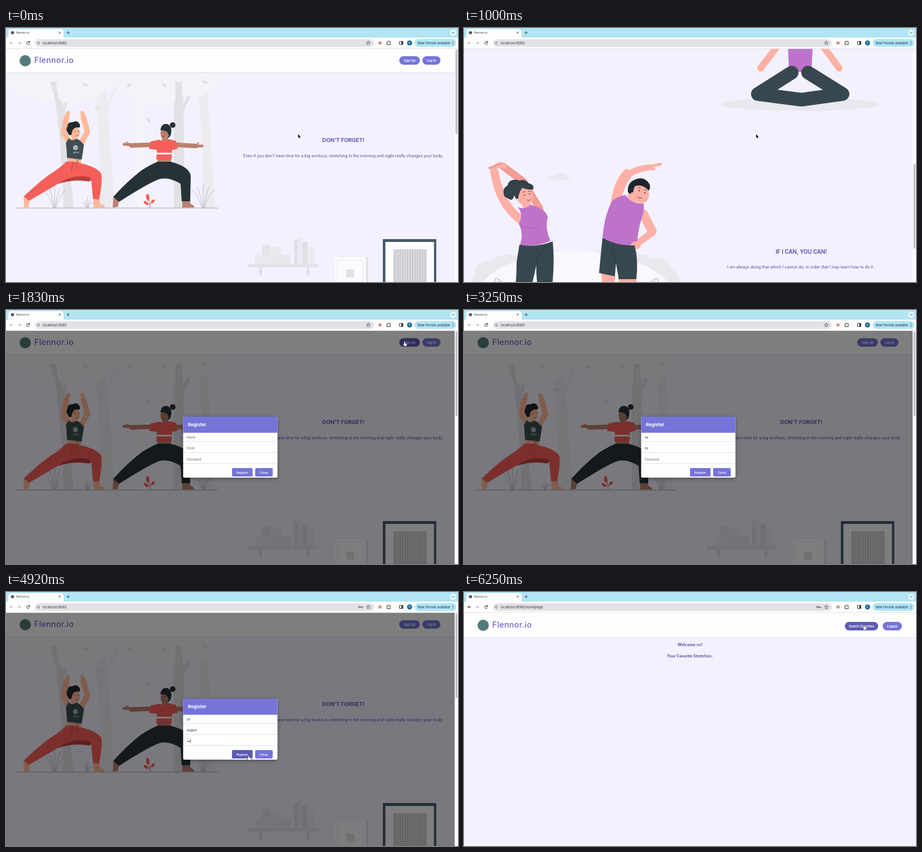
Recreate the animation shown at these times as an HTML page with a canvas. Size 800x450 px, loop 6.41 s.

```html
<!DOCTYPE html>
<html lang="en">
<head>
<meta charset="utf-8">
<title>flennor.io</title>
<style>
html, body { margin: 0; width: 100%; height: 100%; overflow: hidden; background: #f3f1fd; }
canvas { display: block; width: 800px; height: 450px; }
</style>
</head>
<body>
<canvas id="stage" width="800" height="450"></canvas>
<script>
const ctx = document.getElementById('stage').getContext('2d');
const LOOP = 6410, STEP = 1000 / 12, TOP = 37, END = 718;
const BG = '#f3f1fd', VIOLET = '#7574d8', HOVER = '#5b59b4', INK = '#4c48a8';
const DARK = '#263238', SLATE = '#37474f', CORAL = '#f55f5a';

// ---------- drawing helpers ----------
function shape(color, d) {
  ctx.fillStyle = color;
  ctx.fill(new Path2D(d));
}
function line(color, width, d, cap = 'round') {
  ctx.strokeStyle = color;
  ctx.lineWidth = width;
  ctx.lineCap = cap;
  ctx.lineJoin = 'round';
  ctx.stroke(new Path2D(d));
}
function rect(color, x, y, w, h, r = 0) {
  ctx.fillStyle = color;
  ctx.beginPath();
  ctx.roundRect(x, y, w, h, r);
  ctx.fill();
}
function oval(color, x, y, rx, ry = rx, turn = 0) {
  ctx.fillStyle = color;
  ctx.beginPath();
  ctx.ellipse(x, y, rx, ry, turn, 0, 7);
  ctx.fill();
}
function text(str, x, y, size, color, weight = 400, align = 'left') {
  ctx.font = `${weight} ${size}px Inter, sans-serif`;
  ctx.fillStyle = color;
  ctx.textAlign = align;
  ctx.fillText(str, x, y);
}
function placed(x, y, turn, flip, paint) {
  ctx.save();
  ctx.translate(x, y);
  ctx.rotate(turn);
  ctx.scale(flip, 1);
  paint();
  ctx.restore();
}
function track(t, keys) {
  let i = 1;
  while (i < keys.length - 1 && t > keys[i][0]) i++;
  const [a, va] = keys[i - 1], [b, vb] = keys[i];
  return va + (vb - va) * Math.max(0, Math.min(1, (t - a) / (b - a)));
}

// ---------- timeline ----------
const scrollKeys = [[0, 0], [83, 40], [167, 190], [250, 400], [333, 580], [417, 685], [500, END],
  [750, END], [917, 650], [1083, 480], [1250, 300], [1417, 150], [1583, 68], [1667, 15], [1750, 0]];
const path = [[0, 517, 188], [1250, 517, 188], [1583, 695, 87], [1750, 705, 56], [1917, 705, 56],
  [2500, 350, 226], [4667, 350, 226], [4833, 429, 290], [5333, 429, 290], [5917, 690, 90], [6167, 708, 59]];
const pointer = t => ({
  x: track(t, path.map(k => [k[0], k[1]])),
  y: track(t, path.map(k => [k[0], k[2]])),
  shown: t < 2830 || t > 4660
});
const typed = (str, t, times) => str.slice(0, times.filter(k => t >= k - 5).length);

// ---------- artwork ----------
function trunk(color, x, lean, w) {
  shape(color, `M${x} 80 L${x + w * .8} 80 Q${x + w + lean / 3} 190 ${x + w + lean} 319
    H${x + lean} Q${x + lean * .8} 180 ${x} 80Z`);
}
function grass(x, size) {
  for (let i = -2; i <= 2; i++)
    line('#8d8b98', .5, `M${x + i} 318 Q${x + i * size * .12} ${318 - size * .6} ${x + i * size * .25} ${318 - size + Math.abs(i) * 5}`);
}
function forest() {
  trunk('#ecebf0', 156, 12, 24);
  trunk('#f6f5fa', 226, 6, 16);
  trunk('#ecebf0', 338, 12, 20);
  trunk('#e2e1e5', 80, 22, 18);
  trunk('#e2e1e5', 297, 0, 19);
  line('#e2e1e5', 5, 'M102 150 Q105 120 126 98');
  line('#e2e1e5', 6, 'M308 160 Q317 125 343 94');
  line('#ecebf0', 5, 'M178 145 Q188 112 202 99');
  shape('#f4f3f7', 'M0 80 H205 Q194 107 175 109 Q165 131 138 126 Q113 144 90 124 Q70 138 47 122 Q20 125 15 101 Q4 104 0 94Z');
  shape('#f4f3f7', 'M184 80 H386 Q381 103 360 108 Q342 131 316 118 Q290 144 264 133 Q232 140 224 118 Q197 119 184 80Z');
  shape('#e2e1e5', 'M78 95 H88 L98 150 H93Z M300 95 H311 L314 165 H299Z');
  [[140, 100, .5], [162, 141, -.4], [218, 101, -.6], [252, 163, .8], [280, 101, .7], [352, 96, .4]]
    .forEach(([x, y, a]) => oval('#e0dee6', x, y, 5, 2.3, a));
  line('#9795a2', .9, 'M18 319 H375');
  grass(86, 40);
  grass(144, 18);
  grass(349, 42);
}
function warrior() {
  const skin = '#ffb99a';
  line(skin, 10, 'M114 204 L102 186 L107 158');
  line(skin, 10, 'M132 206 L144 184 L137 158');
  oval(skin, 109, 153, 3.5, 7, .4);
  oval(skin, 136, 153, 3.5, 7, -.4);
  rect(skin, 116, 186, 9, 15, 3);
  oval(skin, 122, 185, 9, 11);
  shape('#1f292e', 'M112 190 Q104 180 109 174 Q109 166 118 167 Q127 162 131 172 Q132 178 125 176 Q117 177 116 189Z');
  oval('#3d2c2b', 122, 183, .8);
  oval('#3d2c2b', 128, 183, .8);
  line('#3d2c2b', .7, 'M124 191 q2 1 4 -1');
  rect(skin, 109, 229, 24, 13);
  shape('#3f4d55', 'M111 195 Q116 202 125 196 Q132 199 138 207 L134 233 L108 230 Q107 209 106 204Z');
  oval('#a9b3b8', 123, 212, 4.5);
  text('RELAX', 124, 222, 3.2, '#cfd7da', 600, 'center');
  shape(skin, 'M31 301 L42 305 L40 318 H32Z M154 300 L165 301 L167 312 Q176 314 175 318 H155Z');
  shape(CORAL, 'M106 237 Q120 235 133 240 Q158 245 168 257 Q172 264 165 304 L154 303 L151 271 Q122 265 92 276 L41 306 L31 299 Q62 269 84 255 Q98 246 106 237Z');
  shape('#bb403e', 'M92 276 Q118 258 148 264 Q152 268 147 272 Q122 267 92 276Z');
  line('#8e3134', .6, 'M118 239 L116 254 M122 239 L128 249');
  line('#3f4d55', .7, 'M123 232 l3 3 l4 -2 M124 237 l5 1');
}
function archer() {
  const skin = '#bd806d';
  line(skin, 8, 'M255 207 L222 208 M302 207 L336 209');
  line(skin, 5, 'M223 207 L209 206 M333 209 L347 209');
  line(skin, 2, 'M220 206 L213 202 M336 208 L341 203');
  rect(skin, 276, 190, 11, 14, 3);
  shape(DARK, 'M274 179 Q275 169 285 170 Q295 174 292 188 Q290 195 285 195Z');
  oval(DARK, 295, 172, 5);
  oval(skin, 281, 187, 7.5, 10);
  shape(DARK, 'M273 181 Q275 170 285 170 Q294 174 291 187 L287 189 Q287 181 273 181Z');
  oval('#3e2a28', 276, 185, .8);
  oval('#3e2a28', 281, 185, .8);
  line('#3e2a28', .7, 'M276 192 q2 1 4 0');
  rect(skin, 268, 229, 24, 11);
  shape(CORAL, 'M271 198 Q279 202 288 197 L301 200 L304 214 L294 216 L293 233 H266 L267 216 L253 214 L256 201Z');
  rect('#fff4f2', 266, 221, 27, 3);
  shape(skin, 'M190 298 L200 306 L198 317 L189 318Z M312 305 H325 L327 312 Q334 314 333 318 H312Z');
  shape(DARK, 'M268 237 H292 Q325 246 327 262 L326 307 H311 L309 276 Q290 264 274 267 Q258 271 200 308 L190 299 Q214 272 240 252 Q256 242 268 237Z');
}
function sprig() {
  line('#9c4846', .8, 'M255 318 Q256 308 250 300 M254 312 L262 307');
  oval(CORAL, 251, 300, 3, 6, -.15);
  oval(CORAL, 248, 310, 5, 2.5, .6);
  oval(CORAL, 260, 307, 4, 2.3, -.8);
}
function study() {
  rect('#e4e2e9', 428, 418, 124, 6);
  [448, 532].forEach(x => rect('#e0dfe5', x, 424, 5, 14));
  rect('#ebe9ef', 441, 402, 29, 16);
  rect('#e6e4eb', 453, 384, 15, 18);
  rect('#eceaf0', 469, 388, 19, 14);
  rect('#e8e6ed', 470, 402, 34, 16);
  [[510, 374, 7], [518, 370, 5], [524, 379, 10], [535, 388, 11]].forEach(([x, y, w], i) =>
    rect(i % 2 ? '#ebe9ef' : '#e2e0e7', x, y, w, 418 - y));
  rect('#e2e0e7', 583, 406, 58, 59);
  rect('#fbfafd', 582, 406, 55, 58);
  line('#e6e4ea', 1, 'M587 411 H632 V459 H587Z');
  rect('#e2e0e6', 602, 428, 14, 14);
  rect('#46586a', 667, 374, 94.5, 122);
  rect('#fdfcff', 671.5, 379, 86, 112);
  for (let x = 687; x < 744; x += 2.95)
    line('#4a5157', .7, `M${x} 392.5 V${456 + Math.sin(x) * 2}`);
  shape('#ff7b57', 'M685 457 Q695 454 704 457 T724 455 T744 455 V480 H685Z');
  // desk screen and seated figure
  rect('#4c5660', 450, 484.5, 81, 64);
  rect('#dedce2', 451, 485.5, 79, 62);
  oval('#f9f8fc', 715, 520, 6, 4);
  oval('#eae8ef', 595, 700, 140, 12);
  shape('#bd73cc', 'M572 560 Q595 548 619 562 L615 640 Q594 646 575 640Z');
  line('#ffb0a5', 12, 'M578 567 L548 606 L525 636 M613 569 L642 606 L664 636');
  line(SLATE, 24, 'M580 644 L520 682 L597 692 M609 644 L670 682 L597 692');
  rect('#ffb0a5', 588, 535, 14, 24, 5);
  oval(DARK, 595, 528, 20);
  oval('#ffb0a5', 595, 530, 13, 16);
}
function sideShoe() {
  shape('#36454d', 'M-20 -9 Q-13 -13 -6 -11 Q2 -1 15 1 Q23 4 20 11 Q0 16 -20 8Z');
  shape('#fbfaff', 'M9 1 Q23 2 21 10 Q16 14 8 12Z');
  line('#fbfaff', 1.5, 'M-20 9 Q0 16 20 11 M-7 -6 l-4 4 M-2 -2 l-5 5 M4 1 l-4 5');
}
function frontShoe() {
  shape('#36454d', 'M-8 -21 H9 Q13 -2 11 12 Q8 20 0 20 Q-9 20 -10 10 Q-12 -4 -8 -21Z');
  shape('#fbfaff', 'M-9 8 Q0 4 11 8 Q11 20 0 20 Q-10 20 -9 8Z');
  line('#fbfaff', 1.4, 'M-5 -11 H6 M-6 -6 H7 M-6 -1 H7');
}
function fern(x, flip) {
  placed(x, 350, 0, flip, () => {
    line('#8170bd', .8, `M0 0 Q0 -35 -25 -57 Q-36 -64 -33 -52 Q-24 -39 -8 -30 M-1 -8 Q-12 -25 -27 -32
      Q-40 -38 -33 -24 Q-22 -12 0 -2 M-28 -55 Q-7 -34 0 -5 M-30 -29 Q-12 -20 0 0`);
  });
}
function garden() {
  const squared = v => Math.sign(v) * Math.abs(v) ** .65;
  for (let i = 0; i <= 26; i++) {
    const a = Math.PI * (i - 3) / 20;
    oval('#e9e8ed', 197 - 168 * squared(Math.cos(a)), 316 - 56 * squared(Math.sin(a)), 18 + 4 * Math.sin(i * 2.4));
  }
  oval('#faf8fd', 197, 340, 183, 98);
  oval('#ebe9f0', 168, 113, 20, 5);
  oval('#ebe9f0', 172, 109, 10, 6);
  oval('#dbd9de', 126, 375, 64, 37);
  oval('#dbd9de', 271, 375, 64, 37);
  fern(88, 1);
  fern(310, -1);
}
function stretcher() {
  const skin = '#ffb0a6';
  line('#f39d94', 13, 'M134 167 L105 119 L69 92');
  line(skin, 15, 'M99 186 Q63 158 54 103');
  line(skin, 9, 'M51 101 Q49 94 66 89 L71 92');
  line('#f39d94', 4, 'M45 95 L65 87');
  rect(skin, 103, 149, 15, 18, 5);
  oval(skin, 107, 143, 15, 18, -.25);
  shape('#33414a', 'M72 146 Q66 132 77 126 Q80 112 98 117 Q109 114 114 122 Q126 125 122 133 Q111 134 104 130 Q98 135 96 148 Q92 154 89 143 Q86 155 80 150Z');
  oval('#51363c', 107, 143, 1.1);
  oval('#51363c', 116, 141, 1.1);
  line('#51363c', .9, 'M104 138 l4 -1 M114 136 l4 1 M112 152 q4 2 6 -2');
  shape('#bd73ca', 'M95 164 Q107 170 118 160 Q146 168 148 182 Q143 203 153 224 Q128 236 99 232 Q106 211 97 194 Q106 177 95 164Z');
  line('#9e55ad', .8, 'M109 199 Q120 205 133 198');
  line(skin, 13, 'M92 348 L90 360 M143 328 L146 343');
  shape(SLATE, 'M98 231 Q126 237 157 225 Q162 269 152 336 L135 334 Q127 293 128 267 Q118 318 101 356 L82 351 Q94 303 93 263Z');
  line('#26343a', 1, 'M128 264 Q130 246 145 236');
  placed(90, 379, .08, -1, frontShoe);
  placed(155, 355, .5, 1, sideShoe);
}
function leaner() {
  const skin = '#ffb0a6';
  line(skin, 18, 'M268 164 Q272 125 289 106');
  line(skin, 11, 'M290 107 Q304 97 327 94');
  line(skin, 5, 'M325 93 L348 88 M325 95 L336 97');
  rect(skin, 289, 139, 19, 18, 5);
  oval(skin, 312, 139, 15, 19, -.35);
  shape('#1d282d', 'M290 137 Q289 120 304 115 Q319 109 328 123 Q331 130 327 135 Q316 123 303 127 Q300 131 299 140 Q293 143 290 137Z');
  oval(skin, 298, 142, 3, 4);
  oval('#51363c', 310, 135, 1.2);
  oval('#51363c', 320, 139, 1.2);
  line('#51363c', 1, 'M308 130 l4 0 M319 133 l4 2 M307 146 q4 4 8 2');
  line(skin, 16, 'M317 176 L333 207');
  line(skin, 12, 'M334 209 L303 231');
  shape('#bd73ca', 'M261 155 Q270 145 286 143 Q295 159 318 158 Q320 170 314 185 Q307 209 306 232 Q275 237 245 223 Q247 184 261 155Z');
  oval(skin, 304, 232, 9, 7);
  shape(skin, 'M243 280 L268 286 L260 344 L248 342Z M272 289 L304 290 Q313 324 313 363 L297 362Z');
  shape(SLATE, 'M245 219 Q273 234 302 232 Q309 258 305 292 H274 L269 264 L267 287 L239 281Z');
  line('#26343a', 1, 'M269 264 Q267 246 261 238');
  placed(240, 354, -.5, -1, sideShoe);
  placed(306, 380, -.08, 1, frontShoe);
}

// ---------- pages ----------
const inside = (p, b) => p.shown && p.x >= b[0] && p.x <= b[0] + b[2] && p.y >= b[1] && p.y <= b[1] + b[3];
function button(label, box, hot, radius = 8, size = 5.5) {
  const [x, y, w, h] = box;
  rect(hot ? HOVER : VIOLET, x, y, w, h, radius);
  text(label, x + w / 2, y + h / 2 + 2, size, '#fff', 600, 'center');
}
function header(bottom, baseline) {
  rect('#ecebf1', 0, bottom, 800, 2);
  rect('#fffeff', 0, TOP, 800, bottom - TOP);
  oval('#527c79', 34, baseline - 4, 10);
  ctx.letterSpacing = '.4px';
  text('Flennor.io', 50, baseline, 14, '#6a62c6', 500);
  ctx.letterSpacing = '0px';
}
const signUp = [696, 50, 36.5, 15], logIn = [737, 50, 32, 15];
const registerBox = [400, 280, 36.5, 15], closeBox = [441, 280, 31, 15];
const searchBox = [674, 53, 59, 15], logoutBox = [741, 53, 34, 15];

function landing(t, mouse) {
  const y = track(t, scrollKeys);
  ctx.save();
  ctx.beginPath();
  ctx.rect(0, TOP, 794, 413);
  ctx.clip();
  ctx.translate(0, -y);
  if (y < 330) { forest(); sprig(); warrior(); archer(); }
  header(78, 62);
  button('Sign Up', signUp, y < 5 && inside(mouse, signUp));
  button('Log In', logIn, false);
  text("DON'T FORGET!", 597, 202, 9.5, INK, 600, 'center');
  text("Even if you don't have time for a big workout, stretching in the morning and night really changes your body.", 597, 228.5, 7, INK, 400, 'center');
  study();
  ctx.translate(0, END);
  if (y > 280) { garden(); stretcher(); leaner(); }
  text('IF I CAN, YOU CAN!', 597, 247, 9.7, INK, 600, 'center');
  text('I am always doing that which I cannot do, in order that I may learn how to do it..', 597, 273, 7, INK, 400, 'center');
  ctx.restore();
  rect('#fbfafc', 794, TOP, 6, 413);
  rect('#c2c1c5', 795.5, 38 + y * 258 / END, 3.5, 150, 2);
}
function field(value, hint, y) {
  rect('#e0dfe4', 314, y, 166, 15.5, 1);
  rect('#fff', 314, y, 166, 14.5, 1);
  text(value || hint, 320, y + 9.5, 5.5, value ? '#26262b' : '#707078');
}
function modal(t, mouse) {
  ctx.save();
  ctx.globalAlpha = track(t, [[1660, 0], [1820, 1]]);
  rect('rgba(0,0,0,.5)', 0, TOP, 794, 413);
  ctx.shadowColor = 'rgba(0,0,0,.35)';
  ctx.shadowBlur = 6;
  ctx.shadowOffsetY = 2;
  rect('#fff', 313.5, 189, 167, 108, 2);
  ctx.shadowColor = 'transparent';
  rect(VIOLET, 313.5, 189, 167, 28.5, [2, 2, 0, 0]);
  text('Register', 322, 206, 8, '#fff', 700);
  field(typed('vv', t, [2833, 2917]), 'Name', 218);
  field(typed('vv@vv', t, [3083, 3250, 3500, 3750, 4000]), 'Email', 237.5);
  const dots = typed('•••', t, [4333, 4417, 4500]);
  field('', dots ? '' : 'Password', 257);
  for (let i = 0; i < dots.length; i++) oval('#222', 321.3 + i * 2, 264.6, .8);
  if (t > 4160) rect('#333', 320 + dots.length * 2.1, 261, .7, 6.5);
  button('Register', registerBox, inside(mouse, registerBox), 2, 5.2);
  button('Close', closeBox, false, 2, 5.2);
  ctx.restore();
}
function home(mouse) {
  header(80, 63);
  button('Search Stretches', searchBox, inside(mouse, searchBox));
  button('Logout', logoutBox, false);
  text('Welcome vv!', 400, 96.3, 7, INK, 600, 'center');
  text('Your Favorite Stretches:', 400, 116, 7, INK, 600, 'center');
}

// ---------- browser window ----------
function browser(t, atHome) {
  rect('#b1e5f4', 0, 0, 800, 18);
  rect('#fdfdfe', 0, 17, 800, 20);
  rect('#fdfdfe', 4, 2, 98, 17, [5, 5, 0, 0]);
  rect('#e4e4e8', 0, 36, 800, 1);
  oval('#555a60', 11.5, 8.3, 2.8);
  text('flennor.io', 18, 10.3, 5.3, '#333');
  line('#333', .8, 'M93.5 6.7 l3 3 m0 -3 l-3 3 M107.5 8.3 h5 m-2.5 -2.5 v5');
  oval('#e6f7fc', 791.5, 8.3, 5.5);
  line('#333', .9, 'M789.5 7.5 l2 2 l2 -2');
  line(atHome ? '#333' : '#b4b4ba', 1, 'M12 26.5 h-5 m2.3 -2.3 l-2.3 2.3 l2.3 2.3');
  line('#b4b4ba', 1, 'M21 26.5 h5 m-2.3 -2.3 l2.3 2.3 l-2.3 2.3');
  line('#333', 1, 'M41.3 25 A2.6 2.6 0 1 0 41.6 27.5 M41.8 23.3 v2.2 h-2.2');
  rect('#e2e1e7', 51, 20, 600, 13.5, 7);
  oval('#fff', 57.5, 26.5, 4.7);
  line('#444', .8, 'M54.8 26.5 a2.7 2.7 0 1 0 5.4 0 a2.7 2.7 0 1 0 -5.4 0 M57.5 26.3 v1.6 m0 -3.2 v.1');
  text('localhost:8080' + (atHome ? '/homepage' : ''), 65, 28.5, 6, '#35353a');
  if (t > 4325) line('#444', .9, 'M624 26.5 a1.6 1.6 0 1 0 3.2 0 a1.6 1.6 0 1 0 -3.2 0 M627.2 26.5 h4 v1.8 m-1.7 -1.8 v1.5');
  line('#444', .8, 'M641.3 23.3 l1 2.1 l2.3 .3 l-1.7 1.6 l.4 2.3 l-2 -1.1 l-2 1.1 l.4 -2.3 l-1.7 -1.6 l2.3 -.3Z');
  oval('#d69990', 662, 26.5, 3);
  line('#333', 1, 'M674.7 24.5 h1.6 q0 -1.6 1.2 -1.6 t1.2 1.6 h1.6 v1.5 q-1.5 .4 0 2.2 v1.4 h-5.6Z');
  line('#333', 1, 'M696.8 23.8 h5.6 v5.4 h-5.6Z');
  rect('#333', 699.7, 23.8, 3, 5.4);
  oval('#176f9b', 714.3, 26.5, 4.5);
  text('K', 714.3, 28.4, 5, '#d6f3ff', 400, 'center');
  rect('#b1e5f4', 723.5, 19.5, 73.5, 14, 7);
  text('New Fennok available', 728.5, 28.5, 5.6, '#16323d');
  [24, 26.5, 29].forEach(y => oval('#16323d', 791, y, .7));
}
function cursor(p, hand) {
  if (!p.shown) return;
  const d = hand
    ? 'M-.5 .5 Q.5 -.6 1.2 .5 V3 L4 3.7 Q4.8 4.2 4.4 6 L3.6 8 H.2 L-2 5 Q-2.2 4 -.5 4.6Z'
    : 'M0 0 V6.6 L1.5 5.3 L2.6 7.7 L3.7 7.2 L2.7 4.9 H4.6Z';
  placed(p.x, p.y, 0, 1, () => {
    line(hand ? '#111' : '#fff', 1, d);
    shape(hand ? '#fff' : '#111', d);
  });
}

function draw(now) {
  const t = Math.floor((now % LOOP + 4) / STEP) * STEP;
  const mouse = pointer(t), atHome = t > 5070, open = t > 1700 && !atHome;
  rect(BG, 0, 0, 800, 450);
  if (atHome) home(mouse);
  else landing(t, mouse);
  if (open) modal(t, mouse);
  browser(t, atHome);
  const targets = atHome ? [searchBox, logoutBox] : t > 1920 ? [registerBox, closeBox] : [signUp, logIn];
  cursor(mouse, targets.some(b => inside(mouse, b)));
}

const start = performance.now();
function frame() {
  draw(performance.now() - start);
  requestAnimationFrame(frame);
}
frame();
</script>
</body>
</html>
```
